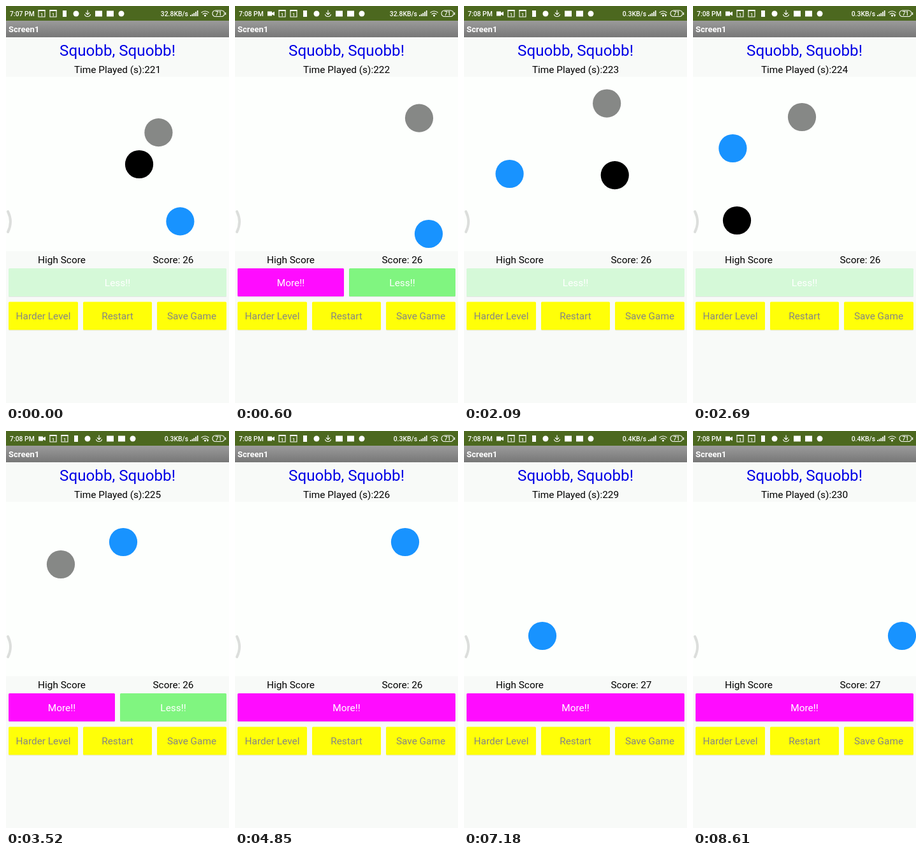
Animation, 350 px wide and 622 px high, one loop 8710 ms. Source, as an HTML page:

```html
<!DOCTYPE html>
<html lang="en">
<head>
<meta charset="utf-8">
<title>Bouncing balls</title>
<style>
  html, body { margin: 0; width: 100%; height: 100%; overflow: hidden; background: #f8faf8; }
  svg { display: block; width: 350px; height: 622px; font-family: Roboto, sans-serif; font-size: 15.4px; }
  .mid { text-anchor: middle; }
  .status { fill: #fff; font-size: 10.4px; font-weight: 500; }
  .line { fill: none; stroke: #fff; stroke-width: 1.1; }
</style>
</head>
<body>
<svg viewBox="0 0 350 622">
  <defs>
    <linearGradient id="bar" x2="0" y2="1">
      <stop stop-color="#9b9b9b"/><stop offset="1" stop-color="#777"/>
    </linearGradient>
    <g id="calendar">
      <path class="line" d="M-5 -4.500H5V5.500H-5Z"/>
      <path class="line" d="M-5.500 -4.500H5.500" style="stroke-width:2"/>
      <text class="mid" y="4.500" fill="#fff" font-size="8" font-weight="500">1</text>
    </g>
  </defs>

  <rect width="350" height="622" fill="#f8faf8"/>
  <rect y="111" width="350" height="273" fill="#fdfffd"/>
  <rect width="350" height="23" fill="#4c681f"/>
  <rect y="23" width="350" height="26" fill="url(#bar)"/>

  <g class="status">
    <text id="clock" x="6" y="15.500"></text>
    <path id="camera" d="M51 8.500h7v2.200l4 -2v6.600l-4 -2v2.200h-7z"/>
    <g id="icons">
      <use href="#calendar" x="56" y="11.500"/>
      <use href="#calendar" x="74" y="11.500"/>
      <rect x="89" y="7" width="6" height="10"/>
      <circle cx="110" cy="12" r="4.500"/>
      <path class="line" d="M128 6.500V13M125 10.500L128 13.500L131 10.500M123.500 13Q124 16.500 128 16.500T132.500 13"/>
      <rect x="140" y="7.500" width="11" height="9"/>
      <rect x="158" y="7.500" width="11" height="9"/>
      <circle cx="181" cy="12" r="4.500"/>
    </g>
    <text id="rate" x="286" y="15.500" text-anchor="end"></text>
    <path d="M289 16v-2h1.700v2zM291.700 16v-3.500h1.700v3.500zM294.400 16v-5h1.700v5zM297.100 16v-7h1.700v7zM299.800 16v-9h1.700v9z"/>
    <path class="line" d="M306.500 10.500Q312.500 5.500 318.500 10.500M308.700 13Q312.500 9.800 316.300 13"/>
    <circle cx="312.500" cy="15" r="1.500"/>
    <path id="traffic" d="M314.500 13.500h4l-2 3.500z"/>
    <rect class="line" x="324" y="7" width="19" height="9.500" rx="4.700"/>
    <rect x="344" y="10" width="1.200" height="4"/>
    <text class="mid" x="333.500" y="15" font-size="9">71</text>
  </g>

  <text x="4" y="41" font-size="13" font-weight="700" fill="#fff">Screen1</text>
  <text class="mid" x="175" y="77.500" font-size="24.200" fill="#0000e6">Squobb, Squobb!</text>
  <text class="mid" id="played" x="175" y="104.500"></text>
  <text class="mid" x="87.500" y="403">High Score</text>
  <text class="mid" id="score" x="262.500" y="403"></text>

  <g id="balls"></g>
  <path d="M3 322Q11 338 3 354" fill="none" stroke="#dcdedc" stroke-width="4" stroke-linecap="round"/>
  <g id="buttons"></g>
</svg>

<script>
const LOOP = 8710, RADIUS = 22.1;
const $ = id => document.getElementById(id);

function add(parent, tag, attrs, text = '') {
  const node = document.createElementNS('http://www.w3.org/2000/svg', tag);
  set(node, attrs);
  node.textContent = text;
  return parent.appendChild(node);
}
function set(node, attrs) {
  for (const key in attrs) node.setAttribute(key, attrs[key]);
}
const show = (node, on) => node.setAttribute('visibility', on ? 'visible' : 'hidden');

// The screen refreshes every 100 ms, with a few longer holds.
const holds = new Set([4, 13, 14, 31, 45, 59, 81]);
const ticks = [];
for (let t = 0, i = 0; t < LOOP; t += holds.has(i++) ? 130 : 100) ticks.push(t);

// Paths are unfolded across the walls: [time, x, y].
const balls = [
  { color: '#868886', path: [[0, 239.4, 198.2], [1460, 376, 136], [2690, 485, 92], [3520, 570, 57], [4350, 650, 22]] },
  { color: '#000', path: [[0, -209, -248], [2690, 543, 70], [3520, 775, 168]], flip: true },
  { color: '#1893ff', path: [[0, 273.4, 337.4], [1460, 490, 419], [2690, 674.4, 501], [3520, 796, 550],
                             [4850, 1001, 632], [7180, 1347, 779], [8610, 1552, 861], [8710, 1567, 867]] }
];
const [gray, black] = balls;
for (const ball of balls) ball.node = add($('balls'), 'circle', { r: RADIUS, fill: ball.color });

function fold(value, low, high) {
  const span = high - low, period = 2 * span;
  const phase = (((value - low) % period) + period) % period;
  return low + (phase > span ? period - phase : phase);
}
// A flipped path runs left and up first.
function position({ path, flip }, t) {
  let i = 1;
  while (i < path.length - 1 && t > path[i][0]) i++;
  const [t0, x0, y0] = path[i - 1], [t1, x1, y1] = path[i];
  const k = (t - t0) / (t1 - t0), sign = flip ? -1 : 1;
  return {
    cx: fold(sign * (x0 + (x1 - x0) * k), 22, 328),
    cy: fold(sign * (y0 + (y1 - y0) * k), 133, 362)
  };
}

function button(label, x, y, width, fill, ink) {
  const group = add($('buttons'), 'g', {});
  const shadow = add(group, 'rect', { y: y + 1, height: 44, rx: 1.5, fill: '#000', opacity: .08 });
  const face = add(group, 'rect', { y, height: 44, rx: 1.5, fill });
  const text = add(group, 'text', { class: 'mid', y: y + 27.5, fill: ink }, label);
  const place = (left, w) => {
    for (const rect of [shadow, face]) set(rect, { x: left, width: w });
    set(text, { x: left + w / 2 });
  };
  place(x, width);
  return { group, face, place };
}
const more = button('More!!', 4, 411, 342, '#ff0cff', '#fff');
const less = button('Less!!', 4, 411, 342, '#80f580', '#fff');
button('Harder Level', 4, 463.5, 109, '#ffff08', '#858585');
button('Restart', 121, 463.5, 108, '#ffff08', '#858585');
button('Save Game', 237, 463.5, 109, '#ffff08', '#858585');

// [time, gray shown, black shown, buttons shown]
const stages = [
  [0, 1, 1, 'less'], [500, 1, 0, 'both'], [1130, 1, 0, 'more'], [1590, 1, 0, 'both'],
  [2090, 1, 1, 'less'], [2890, 1, 0, 'both'], [3920, 0, 0, 'more']
];
const at = (steps, t) => steps.findLast(step => step[0] <= t);

function render(t) {
  for (const ball of balls) set(ball.node, position(ball, t));
  const [, grayOn, blackOn, mode] = at(stages, t);
  show(gray.node, grayOn);
  show(black.node, blackOn);

  const both = mode === 'both', width = both ? 167 : 342;
  show(more.group, mode !== 'less');
  show(less.group, mode !== 'more');
  more.place(4, width);
  less.place(both ? 179 : 4, width);
  set(less.face, { fill: both ? '#80f580' : '#d5f9d8' });

  $('played').textContent = 'Time Played (s):' + (221 + Math.floor((t + 870) / 1000));
  $('score').textContent = 'Score: ' + (t < 6000 ? 26 : 27);
  $('clock').textContent = t < 500 ? '7:07 PM' : '7:08 PM';
  $('rate').textContent = at([[0, '32.8'], [2090, '0.3'], [6080, '0.4']], t)[1] + 'KB/s';
  const recording = t >= 200;
  show($('camera'), recording);
  show($('traffic'), t >= 2090 && t < 6080);
  set($('icons'), { transform: `translate(${recording ? 18 : 0} 0)` });
}

function frame() {
  const now = performance.now() % LOOP;
  render(ticks.findLast(tick => tick <= now));
  requestAnimationFrame(frame);
}
frame();
</script>
</body>
</html>
```
